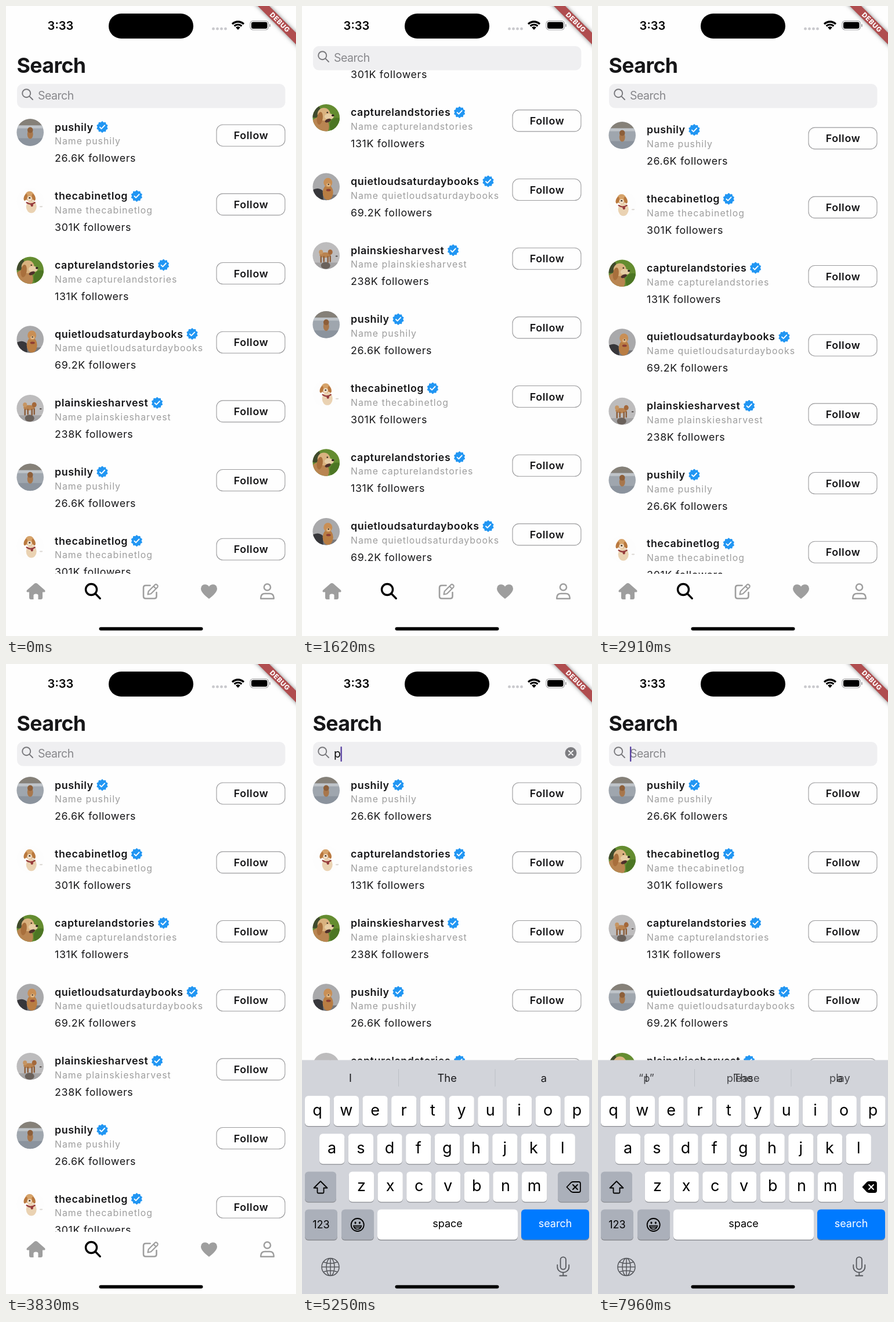
An HTML page with a canvas that plays this animation: 500 px wide and 1084 px high, repeating every 8 s.

```html
<!DOCTYPE html>
<html lang="en">
<head>
<meta charset="utf-8">
<title>Search screen</title>
<style>
html, body { margin: 0; width: 100%; height: 100%; overflow: hidden; background: #fefefe; }
canvas { display: block; }
</style>
</head>
<body>
<canvas id="stage" width="500" height="1084"></canvas>
<script>
const ctx = document.getElementById('stage').getContext('2d');
const TAU = Math.PI * 2;
const LOOP = 8000;
const ROW_STEP = 118.67;
const GRAY = '#9e9e9e';
const INK = '#161618';

const users = [
  ['pushily', '26.6K'],
  ['thecabinetlog', '301K'],
  ['capturelandstories', '131K'],
  ['quietloudsaturdaybooks', '69.2K'],
  ['plainskiesharvest', '238K']
].map(([name, count], photo) => ({ name, count, photo }));

// [time, value] steps: each value holds until the next time
const queries = [[0, ''], [5210, 'p'], [5920, 'pu'], [7310, 'p'], [7880, '']];
const photoQueries = [[0, ''], [5600, 'p'], [6430, 'pu'], [7640, 'p']];
const hints = [
  [0, ['I', 'The', 'a']],
  [5440, ['“p”', 'please', 'play']],
  [6430, ['“pu”', 'put', 'purple']],
  [7480, ['“p”', 'please', 'play']],
  [7900, ['I', 'The', 'a']]
];
const presses = [['p', 5080, 5210], ['u', 5800, 5920]];
const scrollKeys = [
  [500, 0], [620, 50], [760, 190], [900, 305], [1020, 332], [1160, 316.5],
  [1330, 284], [1500, 268], [1750, 260], [2100, 262], [2330, 270.5],
  [2420, 255], [2560, 165], [2700, 62], [2800, 8], [2850, -6], [2880, -7],
  [2910, -5], [3080, -2], [3410, 0]
];

const clamp = (v, a = 0, b = 1) => Math.min(b, Math.max(a, v));
const ramp = (t, a, b) => clamp((t - a) / (b - a));
const stepIndex = (steps, t) => steps.findLastIndex(s => s[0] <= t);
const valueAt = (steps, t) => steps[stepIndex(steps, t)][1];

// Monotone cubic through the keys
function curve(keys, t) {
  const last = keys.length - 1;
  if (t <= keys[0][0]) return keys[0][1];
  if (t >= keys[last][0]) return keys[last][1];
  const i = stepIndex(keys, t);
  const slope = j => (keys[j + 1][1] - keys[j][1]) / (keys[j + 1][0] - keys[j][0]);
  const tangent = j => {
    if (j === 0 || j === last) return 0;
    const a = slope(j - 1), b = slope(j);
    return a * b <= 0 ? 0 : 2 * a * b / (a + b);
  };
  const [t0, v0] = keys[i], [t1, v1] = keys[i + 1];
  const d = t1 - t0, u = (t - t0) / d, w = 1 - u;
  return v0 * (1 + 2 * u) * w * w + tangent(i) * d * u * w * w
    + v1 * u * u * (3 - 2 * u) - tangent(i + 1) * d * u * u * w;
}

function text(str, x, y, size, { weight = 400, color = INK, gap = 0, align = 'left' } = {}) {
  ctx.font = `${weight} ${size}px Inter, sans-serif`;
  ctx.letterSpacing = gap + 'px';
  ctx.textAlign = align;
  ctx.fillStyle = color;
  ctx.fillText(str, x, y);
  return ctx.measureText(str).width;
}

function box(x, y, w, h, r, color) {
  ctx.beginPath();
  ctx.roundRect(x, y, w, h, r);
  ctx.fillStyle = color;
  ctx.fill();
}

function oval(x, y, rx, ry, color, turn = 0) {
  ctx.beginPath();
  ctx.ellipse(x, y, rx, ry, turn, 0, TAU);
  ctx.fillStyle = color;
  ctx.fill();
}

function stroke(path, color, width) {
  ctx.strokeStyle = color;
  ctx.lineWidth = width;
  ctx.lineCap = ctx.lineJoin = 'round';
  ctx.stroke(new Path2D(path));
}

function fill(path, color) {
  ctx.fillStyle = color;
  ctx.fill(new Path2D(path));
}

function at(x, y, draw) {
  ctx.save();
  ctx.translate(x, y);
  draw();
  ctx.restore();
}

function clipped(x, y, w, h, draw) {
  ctx.save();
  ctx.beginPath();
  ctx.rect(x, y, w, h);
  ctx.clip();
  draw();
  ctx.restore();
}

const photos = [
  () => {
    box(-24, -24, 48, 48, 0, '#9fa6ae');
    box(-24, -24, 48, 12, 0, '#858078');
    box(-24, -12, 48, 5, 0, '#bfc4c9');
    box(-24, 10, 48, 14, 0, '#8b939d');
    oval(0, 3, 5, 8, '#a8774c');
    oval(0, -4, 4.8, 5, '#8d5f3a');
  },
  () => {
    box(-24, -24, 48, 48, 0, '#fdfdfd');
    oval(2, 9, 9, 11, '#ead2b2');
    oval(-1, -9, 8, 8.5, '#d6a36a');
    oval(-8, -7, 2.8, 6, '#b9783e', 0.3);
    oval(6, -7, 2.8, 6, '#b9783e', -0.3);
    oval(-1, -5, 4, 4, '#f0dfc8');
    oval(-1, -6, 1.5, 1.2, '#33251e');
    stroke('M-6 2 Q1 7 8 2', '#963b3c', 2.4);
    oval(3, 6, 2.2, 3, '#963b3c');
    oval(19, 9, 3, 1, '#d9d5d0');
  },
  () => {
    box(-24, -24, 48, 48, 0, '#648c30');
    oval(18, 14, 12, 14, '#4c7624');
    oval(-20, -12, 10, 12, '#3f4a2c');
    oval(-11, 15, 16, 16, '#b98551');
    oval(-4, -6, 11, 11, '#d9b27f');
    oval(5, -2, 8, 5, '#e6cda4');
    oval(-11, 1, 5, 11, '#a86f3c', 0.15);
    oval(3, 5, 5.5, 2.8, '#4e302b', -0.4);
    oval(11.5, -4, 2.2, 1.8, '#2b211d');
    oval(2, -9, 1.2, 1.2, '#2b211d');
  },
  () => {
    box(-24, -24, 48, 48, 0, '#a9a9ab');
    box(-24, 14, 48, 10, 0, '#77777a');
    fill('M-24 6 Q-14 0 -6 7 L-5 24 H-24Z', '#37373b');
    oval(3, 10, 9, 13, '#b97d43');
    oval(3, -7, 7.5, 8, '#c98f55');
    oval(4, -3, 3.5, 3, '#e0b988');
    oval(4, -4, 1.4, 1.1, '#3a2b23');
    oval(4, 6, 4, 2, '#8c3d34');
  },
  () => {
    box(-24, -24, 48, 48, 0, '#bdbcbd');
    box(-24, 12, 48, 12, 0, '#a3a2a3');
    oval(-1, 17, 8, 6, '#6a615b');
    oval(-2, -1, 9.5, 4.5, '#b98350');
    oval(7, -6, 4, 4.5, '#a4683a');
    oval(-9, -6, 3.5, 4, '#c69562');
    stroke('M-9 2 V11 M-4 2 V10 M3 2 V11 M7 1 V10', '#8a5a36', 2.4);
    oval(18, 1, 2, 1, '#4b4542');
  }
];

function avatar(kind, x, y) {
  at(x, y, () => {
    ctx.beginPath();
    ctx.arc(0, 0, 23.3, 0, TAU);
    ctx.clip();
    photos[kind]();
  });
}

function badge(x, y) {
  at(x, y, () => {
    ctx.beginPath();
    for (let i = 0; i < 80; i++) {
      const a = i / 80 * TAU, r = 9.1 + 0.8 * Math.cos(a * 10);
      ctx.lineTo(r * Math.sin(a), -r * Math.cos(a));
    }
    ctx.fillStyle = '#2196f3';
    ctx.fill();
    stroke('M-4 0.4 L-1.3 3 L4.2 -2.8', '#fff', 1.9);
  });
}

function row(user, photo, y) {
  avatar(photo, 41.7, y + 23.5);
  const width = text(user.name, 84, y + 20.5, 17.8, { weight: 600, gap: 0.58 });
  badge(84 + width + 15.3, y + 14.2);
  text('Name ' + user.name, 84, y + 44.2, 15.8, { color: GRAY, gap: 1.04 });
  text(user.count + ' followers', 84, y + 74.2, 17.8, { gap: 0.66 });
  ctx.beginPath();
  ctx.roundRect(363, y + 10.2, 118, 37, 11);
  ctx.strokeStyle = '#9b9b9d';
  ctx.lineWidth = 1.1;
  ctx.stroke();
  text('Follow', 422.5, y + 35.2, 17.9, { weight: 600, gap: 0.65, align: 'center' });
}

function list(t, scroll) {
  const match = q => users.filter(u => u.name.includes(q));
  const shown = match(valueAt(queries, t));
  const faces = match(valueAt(photoQueries, t));
  const top = 172.5 - clamp(scroll, 0, 65);
  clipped(0, top, 500, 977 - top, () => {
    const first = Math.max(0, Math.floor((scroll - 200) / ROW_STEP));
    for (let i = first; i < first + 10; i++) {
      row(shown[i % shown.length], faces[i % faces.length].photo, 194 + i * ROW_STEP - scroll);
    }
  });
}

function cursorAlpha(t) {
  if (t < 3850) return 0;
  if (t < 5210) return 1 - ramp(t, 4750, 4900);
  if (t < 7310) return 1 - ramp(t, 6870, 7040);
  return 1;
}

function header(t, scroll) {
  const lift = clamp(scroll, 0, 65);
  clipped(0, 64, 500, 112, () => {
    text('Search', 18.5, 114.8 - lift, 35.7, { weight: 700, gap: -0.6 });
  });
  at(0, -lift, () => {
    box(19, 134, 462.5, 41.5, 10, '#efeff1');
    stroke('M42.2 150.2 A7 7 0 1 1 28.2 150.2 A7 7 0 1 1 42.2 150.2 M40.4 155.4 L46 161', '#77777b', 1.9);
    const query = valueAt(queries, t);
    const width = text(query || 'Search', 55, 161.3, 19.5,
      { color: query ? '#0a0a0a' : '#87878b', gap: query ? 0 : -0.5 });
    if (query) {
      oval(463.5, 153, 10, 10, '#7d7d81');
      stroke('M459.8 149.3 L467.2 156.7 M467.2 149.3 L459.8 156.7', '#fff', 1.8);
    }
    ctx.globalAlpha = cursorAlpha(t);
    box(55 + (query ? width - 0.5 : 0), 142, 2.4, 26, 1, '#5b44a3');
    ctx.globalAlpha = 1;
  });
}

function statusBar() {
  text('3:33', 94, 41, 20.1, { weight: 600, color: '#000', align: 'center' });
  box(177, 13, 146, 43, 21.5, '#000');
  for (let i = 0; i < 4; i++) oval(357.5 + i * 7, 39.2, 2.4, 2.4, '#c9c9cd');
  at(400, 41, () => {
    ctx.lineCap = 'butt';
    ctx.strokeStyle = '#000';
    const arc = (r, w) => {
      ctx.beginPath();
      ctx.arc(0, 0, r, -Math.PI * 0.75, -Math.PI * 0.25);
      ctx.lineWidth = w;
      ctx.stroke();
    };
    arc(14, 3.4);
    arc(9, 3.2);
    fill('M0 0 L-4 -4.2 A5.7 5.7 0 0 1 4 -4.2Z', '#000');
  });
  ctx.beginPath();
  ctx.roundRect(421, 25.5, 31.5, 15.5, 5);
  ctx.strokeStyle = '#a4a4a6';
  ctx.lineWidth = 1.2;
  ctx.stroke();
  box(423, 27.5, 27.5, 11.5, 3.3, '#000');
  box(454, 31, 1.8, 5, 1, '#a4a4a6');
}

function banner() {
  at(500, 0, () => {
    ctx.rotate(Math.PI / 4);
    ctx.shadowColor = 'rgba(0,0,0,.5)';
    ctx.shadowBlur = 7;
    ctx.fillStyle = '#b04d4f';
    ctx.fillRect(-60, 32.6, 120, 14);
    ctx.shadowBlur = 0;
    text('DEBUG', 0.4, 43.6, 11.5, { weight: 800, color: '#fff', gap: 0.7, align: 'center' });
  });
}

function navBar() {
  at(51.5, 1007, () => {
    fill('M0 -14 Q1.5 -14 3 -12.7 L15.5 -1.8 Q17 1 14.5 1.6 H11.5 V11 Q11.5 14 8.5 14 H4 V7 Q4 4.5 0 4.5 Q-4 4.5 -4 7 V14 H-8.5 Q-11.5 14 -11.5 11 V1.6 H-14.5 Q-17 1 -15.5 -1.8 L-3 -12.7 Q-1.5 -14 0 -14Z', GRAY);
  });
  at(147, 1004, () => {
    stroke('M9.5 0 A9.5 9.5 0 1 1 -9.5 0 A9.5 9.5 0 1 1 9.5 0 M7 7 L15.2 15.4', '#000', 3.4);
  });
  at(249.5, 1007, () => {
    stroke('M-1 -10 H-8.5 Q-12.5 -10 -12.5 -6 V8.5 Q-12.5 12.5 -8.5 12.5 H6 Q10 12.5 10 8.5 V2', GRAY, 2.6);
    stroke('M-5 5.5 L-3.8 0 L7.5 -11.3 Q9 -12.6 10.5 -11.3 L11.8 -10 Q13 -8.4 11.8 -7 L0.5 4.3Z M5 -8.5 L9 -4.5', GRAY, 2.2);
  });
  at(350, 1007, () => {
    fill('M0 13 Q-14 2.5 -14 -4.5 Q-13.5 -11.5 -7 -11.7 Q-2.5 -11.7 0 -8 Q2.5 -11.7 7 -11.7 Q13.5 -11.5 14 -4.5 Q14 2.5 0 13Z', GRAY);
  });
  at(450.5, 1007, () => {
    stroke('M5.6 -7 A5.6 5.6 0 1 1 -5.6 -7 A5.6 5.6 0 1 1 5.6 -7 M-11.2 12.7 V11 Q-10.8 4 -4 4 H4 Q10.8 4 11.2 11 V12.7Z', GRAY, 2.5);
  });
}

function key(x, y, w, color) {
  box(x, y + 1.3, w, 52, 6, '#8b8d92');
  box(x, y, w, 52, 6, color);
}

function bubble(letter, x, y, w) {
  const left = x - 10, right = Math.min(x + w + 10, 499), top = y - 60;
  ctx.save();
  ctx.shadowColor = 'rgba(0,0,0,.35)';
  ctx.shadowBlur = 4;
  fill(`M${left + 9} ${top} H${right - 9} Q${right} ${top} ${right} ${top + 9} V${y - 14}
    Q${right} ${y - 6} ${x + w} ${y + 4} V${y + 46} Q${x + w} ${y + 52} ${x + w - 6} ${y + 52}
    H${x + 6} Q${x} ${y + 52} ${x} ${y + 46} V${y + 4} Q${left} ${y - 6} ${left} ${y - 14}
    V${top + 9} Q${left} ${top} ${left + 9} ${top}Z`, '#fff');
  ctx.restore();
  text(letter, (left + right) / 2, y - 20, 39, { color: '#000', align: 'center' });
}

function hintBar(t) {
  const i = stepIndex(hints, t);
  const fade = i ? ramp(t, hints[i][0], hints[i][0] + 120) : 1;
  const show = (words, alpha) => {
    ctx.globalAlpha = alpha;
    words.forEach((word, n) => text(word, 83.5 + n * 166.7, 718.5, 18.3, { align: 'center' }));
  };
  if (fade < 1) show(hints[i - 1][1], 1 - fade * fade);
  show(hints[i][1], Math.min(1, fade * 1.6));
  ctx.globalAlpha = 1;
  box(166, 697, 1, 30, 0, '#bcbfc6');
  box(332.5, 697, 1, 30, 0, '#bcbfc6');
}

function keyboard(t) {
  if (t < 3830) return;
  const x = (t - 3830) * 0.0148;
  const MOD = '#abb0ba';
  at(0, 403 * (1 + x) * Math.exp(-x), () => {
    box(0, 681.5, 500, 403, 0, '#d2d4da');
    hintBar(t);
    const held = presses.find(p => t >= p[1] && t < p[2]);
    let popup;
    [['qwertyuiop', 5], ['asdfghjkl', 30], ['zxcvbnm', 80.8]].forEach(([letters, left], r) => {
      [...letters].forEach((letter, n) => {
        const kx = left + n * 49.7, ky = 743 + r * 65.2;
        key(kx, ky, 43.3, '#fff');
        if (held && held[0] === letter) popup = () => bubble(letter, kx, ky, 43.3);
        else text(letter, kx + 21.6, ky + 33.5, 27, { color: '#000', align: 'center' });
      });
    });

    key(5, 873.4, 54, MOD);
    stroke('M32 890 L43.5 901.5 H37.5 V909 Q37.5 910.5 36 910.5 H28 Q26.5 910.5 26.5 909 V901.5 H20.5Z', '#000', 1.8);

    const deleting = t >= 7290;
    const eraser = 'M456.5 900 L464 892.2 Q465.5 891 467.5 891 H477 Q480 891 480 894 V906 Q480 909 477 909 H467.5 Q465.5 909 464 907.8Z';
    key(441, 873.4, 54, deleting ? '#fff' : MOD);
    if (deleting) fill(eraser, '#000');
    stroke(eraser, '#000', 1.8);
    stroke('M467 896 L475 904 M475 896 L467 904', deleting ? '#fff' : '#000', 1.9);

    key(5, 938.6, 56, MOD);
    key(68, 938.6, 56, MOD);
    key(130, 938.6, 242, '#fff');
    key(378, 938.6, 117, '#007aff');
    text('123', 33, 971, 18, { color: '#000', align: 'center' });
    text('space', 251, 969.3, 18, { color: '#000', align: 'center' });
    text('search', 436.5, 969.3, 18, { color: '#fff', align: 'center' });

    at(95.7, 965, () => {
      stroke('M11 0 A11 11 0 1 1 -11 0 A11 11 0 1 1 11 0', '#000', 1.8);
      oval(-3.7, -3.5, 1.5, 2.1, '#000');
      oval(3.7, -3.5, 1.5, 2.1, '#000');
      stroke('M-6.8 1.5 H6.8 Q5.5 7.5 0 7.5 Q-5.5 7.5 -6.8 1.5Z M-6 4 H6', '#000', 1.5);
    });
    at(49, 1037.5, () => {
      stroke('M15 0 A15 15 0 1 1 -15 0 A15 15 0 1 1 15 0 M0 -15 V15 M-15 0 H15 M7 0 A7 15 0 1 1 -7 0 A7 15 0 1 1 7 0 M-12 -8.5 Q0 -4 12 -8.5 M-12 8.5 Q0 4 12 8.5', '#55575c', 1.5);
    });
    at(450.3, 1036, () => {
      stroke('M-4.7 -11 A4.7 4.7 0 0 1 4.7 -11 V1 A4.7 4.7 0 0 1 -4.7 1Z M-10 -2 V1.5 A10 9.5 0 0 0 10 1.5 V-2 M0 11 V16.5 M-6 16.5 H6', '#55575c', 1.8);
    });
    if (popup) popup();
  });
}

function draw(t) {
  box(0, 0, 500, 1084, 0, '#fefefe');
  const scroll = curve(scrollKeys, t);
  list(t, scroll);
  header(t, scroll);
  navBar();
  keyboard(t);
  statusBar();
  banner();
  box(160.5, 1068.7, 179, 5.8, 2.9, '#000');
}

const start = performance.now();
function tick() {
  draw((performance.now() - start) % LOOP);
  requestAnimationFrame(tick);
}
tick();
</script>
</body>
</html>
```
